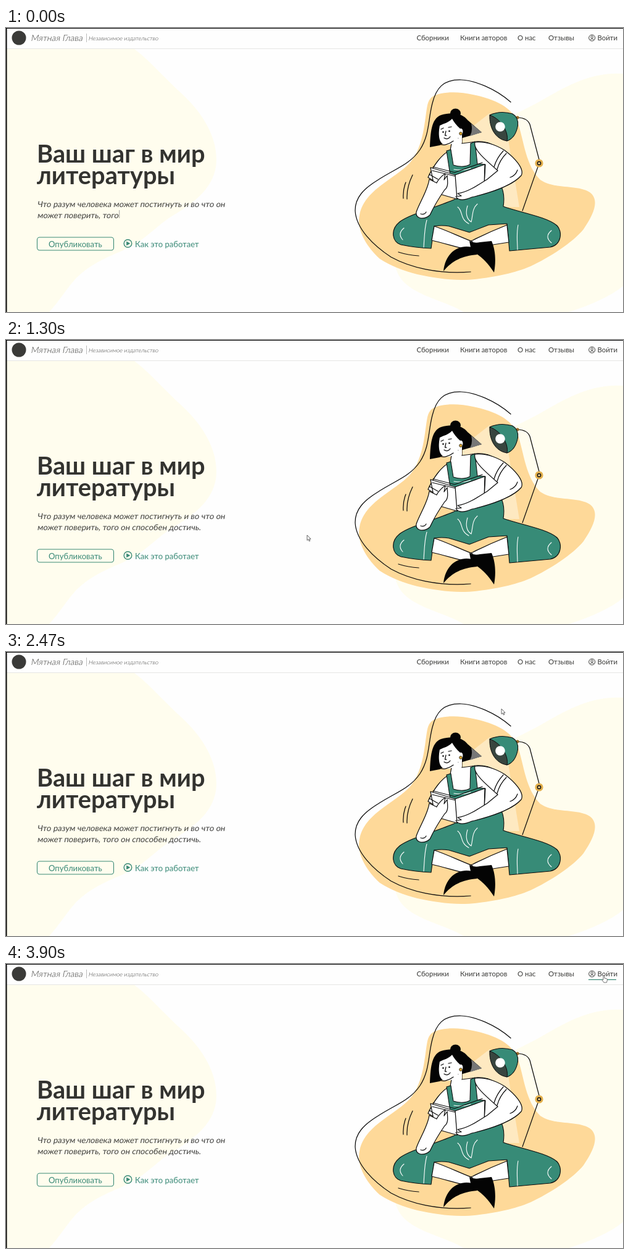
Animation, 1000 px wide and 460 px high, one loop 4.03 s. Source, as an HTML page:

```html
<!DOCTYPE html>
<html lang="ru">
<head>
<meta charset="utf-8">
<title>Мятная Глава</title>
<style>
  html, body { margin: 0; width: 100%; height: 100%; overflow: hidden; background: #fefefe; }
  svg { display: block; width: 100vw; height: 100vh; }
  text { font-family: Lato, "Open Sans", sans-serif; fill: #3c3c3a; white-space: pre; }
  .title { font-size: 39.8px; font-weight: 700; fill: #333330; }
  .nav { font-size: 11.4px; }
  .lead { font-size: 13.1px; }
  .act { font-size: 13.1px; fill: #3a8a77; }
  .cream { fill: #fffdee; }
  .ink { fill: none; stroke: #0c0c0c; stroke-width: 1.25; stroke-linecap: round; stroke-linejoin: round; }
  .skin { fill: #fff; stroke: #0c0c0c; stroke-width: 1.25; stroke-linejoin: round; }
  .green { fill: #378b77; stroke: #0c0c0c; stroke-width: 1.1; stroke-linejoin: round; }
  .seam { fill: none; stroke: #fff; stroke-width: 1.1; stroke-linecap: round; }
  .black { fill: #040404; }
</style>
</head>
<body>
<svg viewBox="0 0 1000 460" preserveAspectRatio="none">
  <rect width="1000" height="460" fill="#fefefe"/>

  <!-- backdrop -->
  <path class="cream" d="M0 34H208C232 52 254 78 279 101C313 131 341 170 341 213C341 256 307 282 270 304C240 323 225 345 190 360C160 373 134 384 112 407C96 425 86 443 70 460H0Z"/>
  <path class="cream" d="M1000 74C955 71 918 88 872 115C820 145 760 165 700 215C650 260 610 340 634 395C648 432 710 440 742 460H912C950 448 980 434 1000 418Z"/>

  <!-- header -->
  <rect width="1000" height="33" fill="#fefefe"/>
  <path d="M0 33.5H1000" stroke="#e6e6e4"/>
  <circle cx="21" cy="16" r="11.5" fill="#3a3a38"/>
  <g font-weight="300">
    <text transform="translate(40 20.5) skewX(-10)" font-size="14">Мятная Глава</text>
    <text transform="translate(133.5 20) skewX(-10)" font-size="9.1">Независимое издательство</text>
  </g>
  <path d="M130.5 9V23" stroke="#aaa" stroke-width=".8"/>
  <g class="nav">
    <text x="665.5" y="20">Сборники</text>
    <text x="736" y="20">Книги авторов</text>
    <text x="829" y="20">О нас</text>
    <text x="879" y="20">Отзывы</text>
    <text x="958.5" y="20">Войти</text>
  </g>
  <g fill="none" stroke="#3c3c3a">
    <circle cx="949.7" cy="16" r="5"/>
    <circle cx="949.7" cy="14.6" r="1.8"/>
    <path d="M946.4 19.4Q949.7 15.8 953 19.4"/>
  </g>
  <path id="under" d="" stroke="#3a8a77" stroke-width="1.3"/>

  <!-- headline -->
  <text class="title" x="50" y="217.5">Ваш шаг в мир</text>
  <text class="title" x="50" y="253">литературы</text>
  <text class="lead" transform="translate(50.5 289.5) skewX(-10)">Что разум человека может постигнуть и во что он</text>
  <text class="lead" transform="translate(50.5 308) skewX(-10)" id="typed"></text>
  <path id="caret" d="M0 295V308" stroke="#999" stroke-width=".9"/>
  <rect x="50.5" y="339" width="124" height="21" rx="4" fill="none" stroke="#3a8a77" stroke-width="1.1"/>
  <text class="act" x="69" y="354.5">Опубликовать</text>
  <circle cx="197.5" cy="349" r="6.3" fill="none" stroke="#3a8a77" stroke-width="1.4"/>
  <path d="M195.2 345.6L201.4 349L195.2 352.4Z" fill="#3a8a77"/>
  <text class="act" x="209" y="354.5">Как это работает</text>

  <!-- orange shape, loop and accents -->
  <path fill="#fed999" d="M690 112C705 102 735 103 757 108C800 117 822 132 830 155C840 185 842 222 866 246C890 262 925 253 946 266C962 278 954 300 936 326C918 348 880 372 850 386C820 399 770 408 738 408C690 407 640 396 606 374C582 352 568 325 573 303C580 262 630 245 655 218C678 190 678 150 683 125Q685 116 690 112Z"/>
  <path class="ink" d="M818 120C793 98 760 85 738 84C708 83 697 98 691 122C684 148 687 172 671 197C654 222 630 228 603 246C580 260 565 275 566 297C568 325 595 352 624 371C655 388 700 399 753 395"/>
  <path class="ink" d="M644 276Q643 262 648 250M650 277Q649 258 659 238M636 363Q652 368 669 369"/>
  <path fill="#fff6dc" opacity=".6" d="M784 138L740 172V290H832L814 181Z"/>

  <!-- lamp -->
  <path class="ink" d="M830 145Q845 146 849 156L864 213M862 225L837 296"/>
  <circle cx="829" cy="145" r="2.6" fill="#9a6a2c"/>
  <circle cx="864" cy="219" r="6.6" fill="#e3b04d"/>
  <circle cx="864" cy="219" r="2.6" fill="#f4d48c" stroke="#111" stroke-width="1.5"/>
  <path class="green" d="M784 141Q801 133 821 139Q831 145 829.500 158Q826 178 812 183Z"/>
  <path fill="#38453f" stroke="#0c0c0c" d="M784 141C783 160 792 180 812 183C815 170 804 148 784 141Z"/>
  <circle cx="801" cy="160" r="7.8" fill="#fff"/>

  <!-- legs -->
  <path class="green" d="M728 277C700 290 655 301 638 314C622 327 626 347 640 351Q664 356 689 357L694 321Q706 319 718 321L751 331L782 319L812 317L816 361L882 355C901 351 902 329 893 320C878 306 830 298 806 289Q810 262 797 249L740 268Z"/>
  <path class="seam" d="M732 290C741 296 735 309 750 317M748 288C744 300 747 310 754 314C757 303 755 293 764 285M645 324Q634 333 643 343M884 328Q872 338 884 348M682 311C678 325 678 342 677 355M830 319C827 334 829 347 829 359"/>
  <path class="skin" d="M812 319Q784 330 756 344L741 347L756 358Q785 351 815 347Z"/>
  <path class="skin" d="M694 321C715 328 735 338 756 346L752 360C730 355 708 348 690 344Z"/>
  <path class="black" d="M755 355C732 350 712 365 709 394C723 377 739 369 764 367Z"/>
  <path class="black" d="M751 345Q759 349 768 347L787 345C794 361 794 380 791 396C779 378 770 370 754 360Z"/>

  <!-- torso -->
  <path class="skin" d="M722 187L720 198C706 204 692 224 684 242L701 252L738 272L805 250L812 206C792 187 778 183 762 184L739 187V172H722Z"/>
  <path class="green" d="M714 199L721 197L725 222Q741 227 752 221L753 187L760 184L764 220L777 221L775 255L727 270L719 232Z"/>
  <path class="seam" d="M726 229Q741 232 753 227"/>

  <!-- head -->
  <ellipse class="black" cx="728.500" cy="138" rx="8.500" ry="7.500"/>
  <path class="black" d="M687 193C688 170 689 147 705 141C724 135 741 139 748 149L771 169L740 178L724 180L703 190Z"/>
  <path fill="#777" d="M754 155L771 169L752 175Q757 166 754 155Z"/>
  <path fill="#fff" d="M703 158C700 174 702 188 712 189C721 190 728 186 733 178L739 187V173C742 168 740 161 736 163C730 158 726 152 723 147C718 153 709 155 703 158Z"/>
  <path class="ink" d="M703 188C708 191 717 189 725 183"/>
  <path class="ink" stroke-width="1" d="M705 164L709 162M717 161L722 160M713 167L711.500 174L714 174M710 178Q716 182 720 176"/>
  <circle class="black" cx="708.500" cy="168.500" r="1.3"/>
  <circle class="black" cx="718.500" cy="167" r="1.3"/>
  <circle cx="737" cy="171" r="2.4" fill="#dca62e" stroke="#111" stroke-width=".7"/>

  <!-- book and arms -->
  <path class="skin" d="M688 226L728 238L776 221L775 258L731 277L696 267Z"/>
  <path class="ink" d="M728 238L731 277M691 231L728 240M692 225L727 234L772 218"/>
  <path class="skin" d="M686 245C684 262 670 283 665 298C663 310 678 311 687 303C694 288 704 272 711 262C717 258 716 249 715 239L710 246L712 236C707 238 699 248 698 251Z"/>
  <path class="ink" d="M686 237L700 245M672 301Q678 303 681 298"/>
  <path class="skin" d="M760 185C757 196 774 211 797 231L780 245C764 255 748 266 732 268L738 272L729 273C734 281 746 278 755 274C785 267 821 255 835 239C841 228 824 210 808 198C792 188 774 183 760 185Z"/>
  <path class="ink" d="M806 199Q795 211 791 225M811 203Q800 214 796 229M829 230Q826 239 817 242"/>

  <g id="cursor">
    <path id="arrow" d="M0 0V8.500L2 6.800L3.400 10L4.800 9.300L3.500 6.300H6Z" fill="#fff" stroke="#555" stroke-width=".9"/>
    <path id="hand" d="M-1 1Q0 -.5 1 1V5L5 6Q6 6.500 5.500 8L4.500 12H0L-3 8Q-3.500 6.500 -1 7.500Z" fill="#fff" stroke="#666" stroke-width=".9"/>
  </g>

  <path d="M0 .5H1000" stroke="#000"/>
  <path d="M.75 0V460" stroke="#000" stroke-width="1.5"/>
</svg>
<script>
  const LOOP = 4030, STEP = 130, HOVER = 3250;
  const LINE = "может поверить, того он способен достичь.";
  const START = 20, CHAR_MS = 47;
  // time, x, y
  const PATH = [
    [390, 481, 398], [650, 481, 397], [1300, 488, 316], [1820, 543, 236],
    [2470, 803, 92], [2990, 926, 38], [3250, 964, 21], [3400, 969, 18], [LOOP, 969, 18]
  ];
  const $ = id => document.getElementById(id);
  const typed = $("typed"), caret = $("caret"), under = $("under");
  const cursor = $("cursor"), arrow = $("arrow"), hand = $("hand");
  const show = (el, on) => el.setAttribute("visibility", on ? "visible" : "hidden");

  function slope(i, k) {
    if (i === 0 || i >= PATH.length - 2) return 0;
    const a = PATH[i - 1], b = PATH[i + 1];
    return (b[k] - a[k]) / (b[0] - a[0]);
  }

  // cubic Hermite through the pointer path
  function pointer(t, k) {
    let i = 0;
    while (i < PATH.length - 2 && t >= PATH[i + 1][0]) i++;
    const a = PATH[i], b = PATH[i + 1], d = b[0] - a[0];
    const u = (t - a[0]) / d, v = 1 - u;
    return a[k] * v * v * (1 + 2 * u) + b[k] * u * u * (3 - 2 * u)
      + d * u * v * (slope(i, k) * v - slope(i + 1, k) * u);
  }

  function render(ms) {
    const t = Math.floor(ms % LOOP / STEP) * STEP;

    const n = Math.min(LINE.length, START + Math.floor(t / CHAR_MS));
    typed.textContent = LINE.slice(0, n);
    show(caret, t < 1170);
    caret.setAttribute("transform", `translate(${52 + typed.getComputedTextLength()} 0)`);

    const seen = t >= PATH[0][0], over = t >= HOVER;
    show(arrow, seen && !over);
    show(hand, over);
    if (seen) cursor.setAttribute("transform", `translate(${pointer(t, 1)} ${pointer(t, 2)})`);

    const grow = Math.min(1, Math.max(0, (t - HOVER + STEP) / 390));
    under.setAttribute("d", grow ? `M944 25.300H${944 + 45 * grow}` : "");
  }

  const begin = performance.now();
  function tick(now) {
    render(Math.max(0, now - begin));
    requestAnimationFrame(tick);
  }
  render(0);
  requestAnimationFrame(tick);
</script>
</body>
</html>
```
